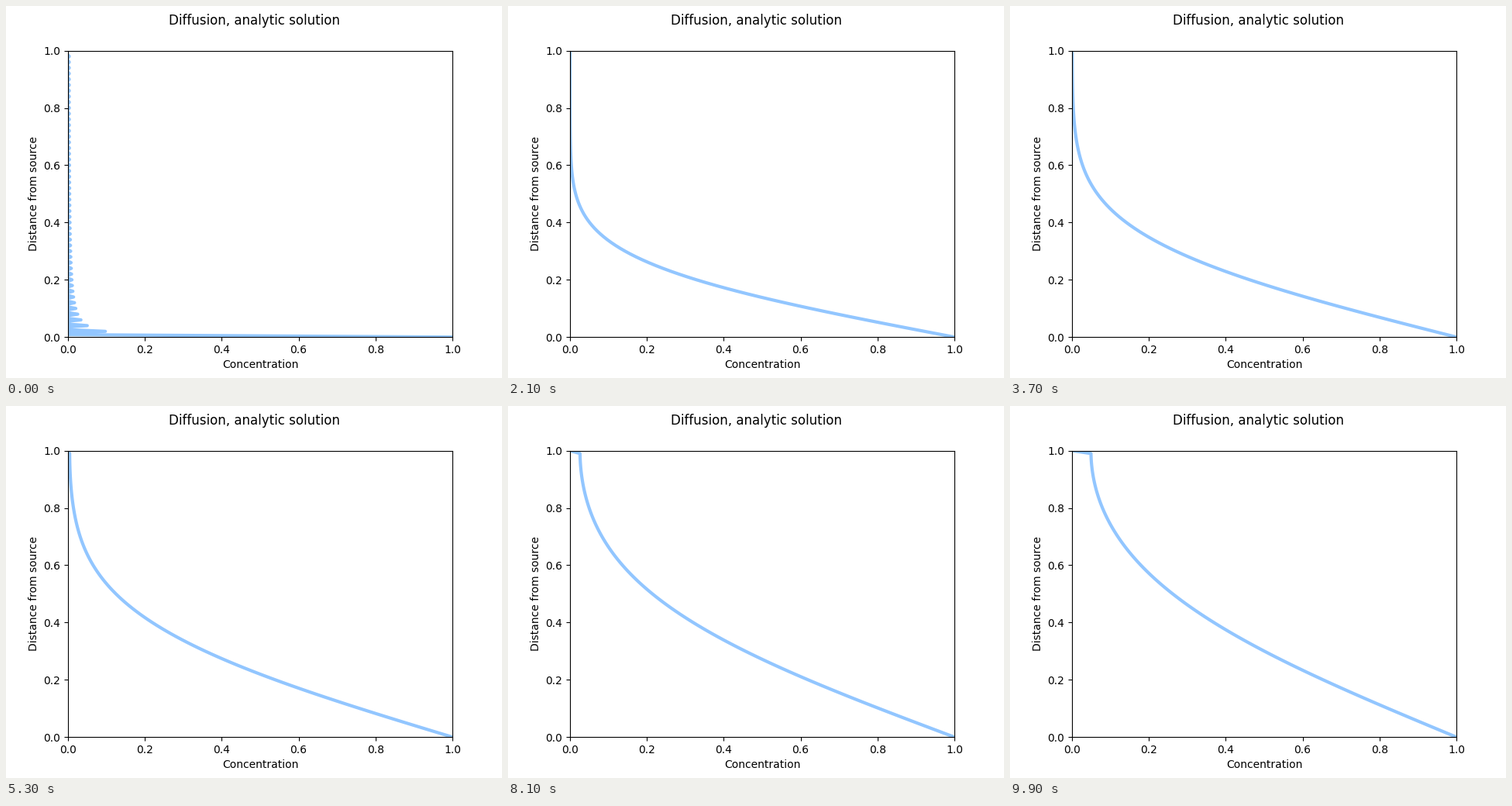
A matplotlib script that plays this animation: 640x480 px, repeating every 10 s.

```python
import numpy as np
import matplotlib.pyplot as plt
from matplotlib.animation import FuncAnimation

FRAMES = 100
INTERVAL = 100   # ms
DT = 0.001       # diffusion time (D * t) per frame
TERMS = 100

y = np.linspace(0, 1, 101)
k = (2 * np.arange(TERMS) + 1) * np.pi / 2
modes = 2 / k * np.sin(np.outer(y, k))


def concentration(t):
    """Fourier series for a fixed source at 0 and a closed far end."""
    c = 1 - modes @ np.exp(-k**2 * t)
    c[-1] = 0
    return c


fig, ax = plt.subplots(figsize=(6.4, 4.8), dpi=100)
fig.suptitle("Diffusion, analytic solution")
ax.set(xlim=(0, 1), ylim=(0, 1),
       xlabel="Concentration", ylabel="Distance from source")
line, = ax.plot(concentration(0), y, color="#92c6ff", lw=3)


def update(i):
    line.set_xdata(concentration(i * DT))
    return line,


anim = FuncAnimation(fig, update, frames=FRAMES, interval=INTERVAL,
                     repeat=True, repeat_delay=0)
plt.show()
```
